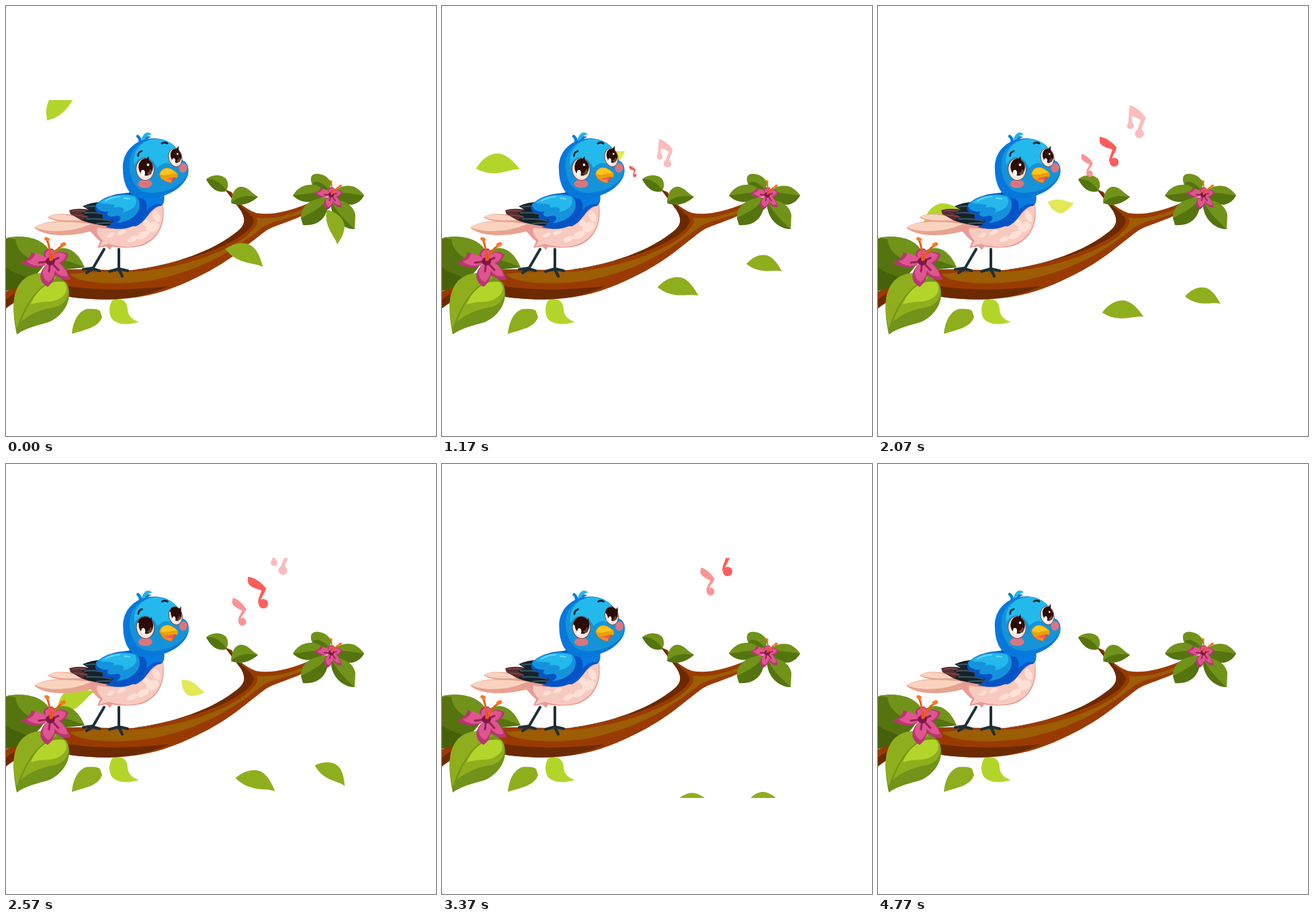
An HTML page with a canvas that plays this animation: 640 by 640 pixels, repeating every 4810 ms.

```html
<!DOCTYPE html>
<html lang="en">
<head>
<meta charset="utf-8">
<title>Singing bird</title>
<style>
html, body { margin: 0; width: 100%; height: 100%; overflow: hidden; background: #fff; }
canvas { display: block; width: 640px; height: 640px; }
</style>
</head>
<body>
<canvas id="stage" width="640" height="640"></canvas>
<script>
const ctx = document.getElementById('stage').getContext('2d');
const LOOP = 4810;
const MOUTH_PERIOD = 543;
const LIME = '#b3d52a', GREEN = '#8fae1d', OLIVE = '#71931a', DEEP = '#55740f';
const INK = '#2b0d05';

function fill(color, d) {
  ctx.fillStyle = color;
  ctx.fill(new Path2D(d));
}
function line(color, width, d) {
  ctx.strokeStyle = color;
  ctx.lineWidth = width;
  ctx.lineCap = ctx.lineJoin = 'round';
  ctx.stroke(new Path2D(d));
}
function oval(color, x, y, rx, ry, turn = 0) {
  ctx.fillStyle = color;
  ctx.beginPath();
  ctx.ellipse(x, y, rx, ry, turn, 0, Math.PI * 2);
  ctx.fill();
}
function placed(x, y, degrees, sx, sy, draw) {
  ctx.save();
  ctx.translate(x, y);
  ctx.rotate(degrees * Math.PI / 180);
  ctx.scale(sx, sy);
  draw();
  ctx.restore();
}

// Smooth path through rows of [time, ...values]
function along(keys, t) {
  let i = 0;
  while (i < keys.length - 2 && t > keys[i + 1][0]) i++;
  const a = keys[i], b = keys[i + 1], span = b[0] - a[0];
  const u = Math.max(0, (t - a[0]) / span);
  if (u > 1) return b.slice(1).map((v, k) => v + (v - a[k + 1]) * (u - 1));
  const slope = (j, k) => {
    const p = keys[Math.max(0, j - 1)], q = keys[Math.min(keys.length - 1, j + 1)];
    return (q[k] - p[k]) / (q[0] - p[0]) * span;
  };
  return a.slice(1).map((v, n) => {
    const k = n + 1, w = u * u * (3 - 2 * u);
    return v + (b[k] - v) * w + slope(i, k) * u * (1 - u) ** 2 - slope(i + 1, k) * u * u * (1 - u);
  });
}
const ramp = (t, from, to) => {
  const u = Math.min(1, Math.max(0, (t - from) / (to - from)));
  return u * u * (3 - 2 * u);
};

const LEAF = 'M-31 8C-23-9-11-17 0-17C12-16 22-6 31 4C19 4 8 13-10 13C-20 13-26 10-31 8Z';
const leaves = {
  left: { color: LIME, sx: 1.05, sy: 1, keys: [[0, 82, 144, -38], [730, 80, 201, 0], [1630, 89, 274, 0], [2570, 101, 351, -28], [3930, 88, 453, 18], [4770, 92, 522, -10]] },
  pale: { color: '#e2e955', sx: .63, sy: -.68, keys: [[0, 238, 125, -20], [730, 247, 185, -4], [1630, 263, 263, -25], [2570, 277, 334, 24], [3930, 241, 445, 6], [4770, 230, 515, -8]] },
  middle: { color: GREEN, sx: 1, sy: .92, keys: [[0, 357, 370, 29], [730, 350, 401, 32], [1630, 358, 438, 0], [2570, 373, 472, 22], [3370, 373, 505, 0], [4200, 366, 540, 25]] },
  right: { color: GREEN, sx: .87, sy: .82, keys: [[0, 490, 328, 77], [730, 480, 362, 43], [1630, 483, 409, -3], [2570, 485, 460, 38], [3370, 478, 502, -2], [4200, 480, 545, 35]] }
};
function fallingLeaf({ color, sx, sy, keys }, t) {
  const [x, y, a] = along(keys, t);
  placed(x, y, a, sx, sy, () => fill(color, LEAF));
}

const SINGLE = 'M-15-23C-6-23 6-14 12-6C10 2 6 6 5 10L0 17C0 7 5 1 5-3C-4-6-13-8-15-15Z';
const DOUBLE = 'M-9-24C1-21 9-13 14-6C12 2 9 7 8 12L2 14C3 5 7 1 7-2C2-6-3-7-6-8L-6 3L-12 6C-10-4-11-14-9-24Z';
const notes = [
  { color: '#fcbcbc', shape: DOUBLE, heads: [[-8, 6, 5], [5, 17.5, 6.5]], turn: 0, keys: [[200, 262, 252, 0], [730, 300, 237, .66], [1630, 361, 197, 1], [2570, 407, 141, 1], [3000, 425, 110, 1]] },
  { color: '#fd5d5d', shape: SINGLE, heads: [[8, 17, 7]], turn: 0, keys: [[850, 262, 252, 0], [1630, 315, 235, .79], [2570, 375, 191, 1], [3370, 417, 143, 1], [3930, 440, 105, 1]] },
  { color: '#fd9494', shape: SINGLE, heads: [[8, 17, 7]], turn: 8, keys: [[1250, 262, 254, 0], [1630, 280, 249, .46], [2570, 347, 220, .83], [3370, 395, 175, .83], [3930, 416, 138, .83], [4300, 430, 112, .83]] }
];
function musicNote({ color, shape, heads, turn, keys }, t) {
  if (t < keys[0][0]) return;
  const [x, y, s] = along(keys, t);
  placed(x, y, turn, s, s, () => {
    fill(color, shape);
    heads.forEach(([hx, hy, r]) => oval(color, hx, hy, r, r));
  });
}

function branch() {
  fill('#993b00', 'M0 425L60 395C110 388 150 395 190 393C250 386 310 364 345 335C356 326 357 318 350 305L326 273L336 277C343 290 352 300 372 308C395 312 420 306 452 293L452 306C425 322 400 325 385 336C350 362 330 385 260 415C215 434 165 442 95 433C50 425 20 434 0 450Z');
  fill('#6b2a02', 'M326 273L333 277C345 300 368 308 369 321C362 341 320 361 280 373C250 381 220 391 185 393C250 386 310 364 345 335C356 326 357 318 350 305Z');
  fill('#9c5d05', 'M95 399C130 394 165 396 200 395C265 389 330 365 358 342C372 330 378 322 372 315C395 318 425 312 446 300L446 307C420 316 398 320 384 328C345 358 300 392 215 409C160 416 108 413 95 399Z');
  fill('#6b2a02', 'M93 417C140 424 190 423 243 417C205 434 165 442 95 433Z');
  fill('#6b2a02', 'M0 437L12 428L12 440L0 450Z');
}

function twigLeaves() {
  fill(OLIVE, 'M298 258C306 250 322 250 328 258C332 265 330 272 327 276C314 279 305 271 298 258Z');
  fill(DEEP, 'M298 258C310 256 322 264 328 275C314 279 305 271 298 258Z');
  fill(OLIVE, 'M335 293C335 280 341 270 349 269C359 268 364 277 375 284C363 295 347 299 335 293Z');
  fill(DEEP, 'M335 293C346 282 360 282 375 284C363 295 347 299 335 293Z');
}

function petals(dark) {
  const tone = dark ? '#b83673' : '#df5590';
  fill(tone, 'M-2 0C-12-10-20-9-28-14C-30-5-36 0-44 1C-31 12-12 12-2 0Z');
  fill(tone, 'M-5 0C-15-11-9-20 3-19C10-13 10-5 3 0Z');
  fill(tone, 'M0 0C5-15 17-18 27-10C23 3 12 7 0 2Z');
  fill(tone, 'M0 0C18 1 26 14 30 27C16 31 4 20 0 0Z');
  fill(tone, 'M0 0C-19 13-19 30-4 38C9 28 10 12 0 0Z');
}
function flower(x, y, turn, size) {
  placed(x, y, turn, size, size, () => {
    petals(true);
    placed(1, -1, 0, .83, .84, () => petals(false));
    line('#982058', 3, 'M0 0L-17 2M0 0L-2 15M0 0L12 13M0 0L12-5M0 0L0-11');
    oval('#7d1748', 0, 0, 7, 6);
    line('#ee5b16', 3, 'M0-2Q0-20-5-32M2-2Q7-18 19-24');
    oval('#ff7621', -5, -33, 4, 2.6, .4);
    oval('#ff7621', 19, -25, 4.5, 3, -.4);
  });
}

function rightCluster() {
  fill(OLIVE, 'M456 267C450 252 457 249 466 250C475 251 483 258 484 265L480 277Z');
  fill(DEEP, 'M456 267C457 258 469 260 480 272L470 276Z');
  fill(OLIVE, 'M427 282C435 268 450 263 465 268L480 279C463 294 441 296 427 282Z');
  fill(DEEP, 'M427 282C443 281 462 275 476 280C461 294 441 296 427 282Z');
  fill(OLIVE, 'M486 277C499 265 520 262 533 282C524 298 507 301 489 285Z');
  fill(DEEP, 'M486 279C503 276 518 281 533 282C524 298 507 301 489 285Z');
  fill(DEEP, 'M480 285C458 285 438 295 439 316L442 326C467 328 481 313 480 285Z');
  fill(OLIVE, 'M480 285C458 285 438 295 439 316C454 307 469 302 480 285Z');
  fill(OLIVE, 'M484 288C501 288 517 295 520 311L519 332C500 332 481 314 484 288Z');
  fill(DEEP, 'M484 288C490 306 507 321 519 332C500 332 481 314 484 288Z');
  flower(484, 281, 8, .6);
}

function leftCluster() {
  fill(DEEP, 'M0 346C27 340 52 345 64 363C61 389 42 410 0 424Z');
  fill(OLIVE, 'M0 345C27 340 52 345 64 363L58 387C39 378 17 371 14 347Z');
  fill('#456109', 'M0 389C13 399 22 398 36 407C25 417 12 421 0 424Z');
  fill(OLIVE, 'M60 374C73 356 101 351 117 389L82 392Z');
  fill(DEEP, 'M65 378C84 375 101 382 117 389L82 393Z');
  fill(OLIVE, 'M16 489C10 457 7 428 24 409C43 393 74 392 91 414C99 433 91 457 65 470C46 476 29 479 16 489Z');
  fill(GREEN, 'M16 480C10 454 8 427 24 409C41 394 61 395 76 405C54 413 32 432 16 480Z');
  fill(GREEN, 'M22 470C38 428 60 406 89 411C98 428 91 443 74 448C49 452 36 459 22 470Z');
  fill(LIME, 'M37 444C46 421 66 407 86 411C97 424 84 438 65 440Q49 440 37 444Z');
  flower(66, 380, 0, 1);
}

function body() {
  // Legs
  line('#1e3037', 4, 'M146 362L129 391M168 362L168 392');
  line('#1e3037', 4.2, 'M129 390L115 392M129 391L120 397M129 391L139 394M168 391L154 395M168 391L181 394M168 392L173 402');

  // Tail
  fill('#e7a38f', 'M62 315C68 308 84 309 102 311L128 319L124 327C98 323 74 322 62 315Z');
  fill('#f9d3c0', 'M63 314C72 308 88 310 112 315L116 319C92 319 75 320 63 314Z');
  fill('#e7a38f', 'M42 330C54 319 91 318 135 323L128 335C99 343 59 345 42 330Z');
  fill('#f9d3c0', 'M43 329C57 319 91 320 127 324C103 336 63 339 43 329Z');

  // Belly
  fill('#e99c97', 'M116 328L180 318L206 291L234 296C238 325 227 348 202 357C185 361 169 360 158 358L155 363L149 358L136 360L140 350C130 343 126 333 116 328Z');
  fill('#f8cabf', 'M136 330C159 333 177 333 196 325C210 318 214 303 233 296C236 326 226 345 202 355C183 361 167 358 153 354L139 358L144 349C137 342 134 337 136 330Z');
  [[218, 329, 10, 7], [204, 341, 10, 5], [224, 313, 5, 9], [188, 347, 8, 4], [172, 337, 7, 3], [156, 341, 6, 3], [209, 323, 5, 5]].forEach(([x, y, rx, ry]) => oval('#fde0d6', x, y, rx, ry, -.45));

  // Neck and chest
  fill('#0657cf', 'M159 289C173 277 183 278 193 280L235 279C237 290 234 299 227 298C212 303 211 320 193 328L171 326Z');
  fill('#087be0', 'M183 277L234 276Q237 288 232 295C219 293 209 301 204 313C208 300 202 291 183 284Z');

  // Flight feathers
  fill('#572d30', 'M94 304C110 299 128 303 142 309L134 324C113 323 106 314 96 310Z');
  line('#80494a', 1.5, 'M98 305Q117 303 129 310M101 311Q118 312 129 317');
  fill('#14222b', 'M114 298C134 290 151 289 168 300L182 324C161 331 132 327 113 318L123 314L112 308L124 304Z');
  line('#3c5963', 2, 'M119 299Q140 296 154 303M117 308Q136 306 152 312M120 317Q140 316 157 320M135 324Q148 322 163 324');

  // Wing
  fill('#0653c5', 'M133 297C143 284 165 278 188 278C207 282 214 295 207 310C199 327 178 337 148 329C158 326 160 320 158 318C145 321 140 314 146 309C132 309 132 302 133 297Z');
  fill('#1493dc', 'M134 295C149 281 177 277 194 283C207 298 194 321 164 323C173 318 172 313 165 312C153 316 147 311 153 306C140 307 134 302 134 295Z');
  fill('#24b8ed', 'M139 293C153 281 176 279 192 284C198 294 190 304 174 307C179 300 170 298 160 300C164 293 153 296 139 293Z');
  line('#67d6f5', 2, 'M148 290Q158 284 169 284M176 286L184 287');
}

function eye(x, y, rx, ry, turn, lid) {
  ctx.save();
  oval('#733f38', x, y, rx + .8, ry + .8, turn);
  oval('#fbe4dc', x, y, rx, ry, turn);
  ctx.beginPath();
  ctx.ellipse(x, y, rx, ry, turn, 0, Math.PI * 2);
  ctx.clip();
  oval(INK, x + 1, y - ry * .2, rx * .84, ry * .8, turn);
  oval('#70402b', x + rx * .45, y + ry * .22, rx * .34, ry * .28, -.4);
  oval(INK, x + rx * .05, y - ry * .12, rx * .55, ry * .5);
  oval('#fff', x - rx * .25, y + ry * .37, rx * .24, ry * .3);
  oval('#fff', x + rx * .35, y - ry * .42, rx * .14, ry * .13);
  if (lid > .01) oval(INK, x, y - ry * 2.5 + lid * ry * 1.68, rx * 1.55, ry * 1.6);
  ctx.restore();
  const lx = x + rx * (.1 + .75 * lid), ly = y - ry * (.86 - .6 * lid);
  fill(INK, `M${lx - 5} ${ly + 1}Q${lx + 1} ${ly} ${lx + 4} ${ly - 6}Q${lx + 5} ${ly} ${lx + 3} ${ly + 5}Z`);
}

function beak(open) {
  const lift = open * 3, drop = open * 2;
  fill('#d95717', `M230 253Q240 249 252 252Q252 ${259 + drop} 245 ${263 + drop / 2}Q236 262 230 256Z`);
  fill('#ef5960', `M234 ${254 - lift}L251 ${252 - lift}L248 ${258 + drop}Q241 ${261 + drop} 234 256Z`);
  fill('#ff8b26', `M231 255Q239 259 247 ${258 + drop}L246 ${263 + drop / 2}Q236 262 231 255Z`);
  fill('#eaa000', `M228 ${251 - lift}C231 ${240 - lift} 241 ${238 - lift} 250 ${245 - lift}C256 ${248 - lift} 257 ${253 - lift} 254 ${256 - lift}C248 ${252 - lift} 242 ${259 - lift} 232 ${258 - lift}Z`);
  fill('#ffc31e', `M230 ${248 - lift}C234 ${240 - lift} 243 ${240 - lift} 250 ${246 - lift}L254 ${250 - lift}C245 ${248 - lift} 239 ${254 - lift} 230 ${251 - lift}Z`);
}

function head(open, lid) {
  ctx.save();
  ctx.translate(lid * .9, lid * .5);
  line('#0b7edc', 4.5, 'M199 204Q201 198 196 194');
  fill('#087bda', 'M197 207Q204 190 216 195Q208 198 207 204Z');
  fill('#22b5ea', 'M201 202C203 189 211 185 217 191Q208 192 204 204Z');
  fill('#0678dc', 'M174 244C172 217 192 197 221 197C246 198 258 212 263 230C272 233 274 246 269 256C262 269 249 278 230 284C206 292 187 286 179 269Q174 257 174 244Z');
  fill('#1693d8', 'M184 244C180 218 199 199 222 198C247 199 257 213 262 231C272 235 273 247 267 256C257 270 241 276 222 278C198 280 187 265 184 244Z');
  fill('#24b9ed', 'M191 237C187 215 204 198 223 198C244 199 254 209 259 222L246 236Q237 229 225 241Q217 223 202 226Q194 229 191 237Z');
  oval('#d9757f', 207, 264.5, 10.5, 6.3);
  oval('#d9757f', 263.5, 241, 6, 7, .25);
  eye(207, 243, 12.8, 16, -.08, lid);
  eye(252, 225.5, 9.5, 13.3, -.2, lid);
  line('#102637', 2.8, 'M196.5 223Q197 217 202 216M232 204.5Q236 202 240 204.5');
  beak(open);
  ctx.restore();
}

function frame(now) {
  const t = now % LOOP;
  const open = (1 - Math.cos(t / MOUTH_PERIOD * Math.PI * 2)) / 2;
  const lid = ramp(t, 400, 690) * (1 - ramp(t, 790, 1150))
    + ramp(t, 2430, 2740) * (1 - ramp(t, 3220, 3550));

  ctx.fillStyle = '#fff';
  ctx.fillRect(0, 0, 640, 640);
  ctx.save();
  ctx.beginPath();
  ctx.rect(0, 140, 640, 357);
  ctx.clip();

  fallingLeaf(leaves.left, t);
  fallingLeaf(leaves.pale, t);
  fill(LIME, 'M158 438C171 433 181 439 181 452C182 461 187 467 198 470C181 476 164 474 157 465C152 455 154 445 158 438Z');
  fill(GREEN, 'M98 488C100 469 107 455 120 451C130 450 138 451 140 454L143 463C137 479 120 481 98 488Z');
  branch();
  twigLeaves();
  rightCluster();
  leftCluster();
  body();
  head(open, lid);
  fallingLeaf(leaves.middle, t);
  fallingLeaf(leaves.right, t);
  notes.forEach(n => musicNote(n, t));
  ctx.restore();
  requestAnimationFrame(loop);
}
const start = performance.now();
function loop() {
  frame(performance.now() - start);
}
loop();
</script>
</body>
</html>
```
